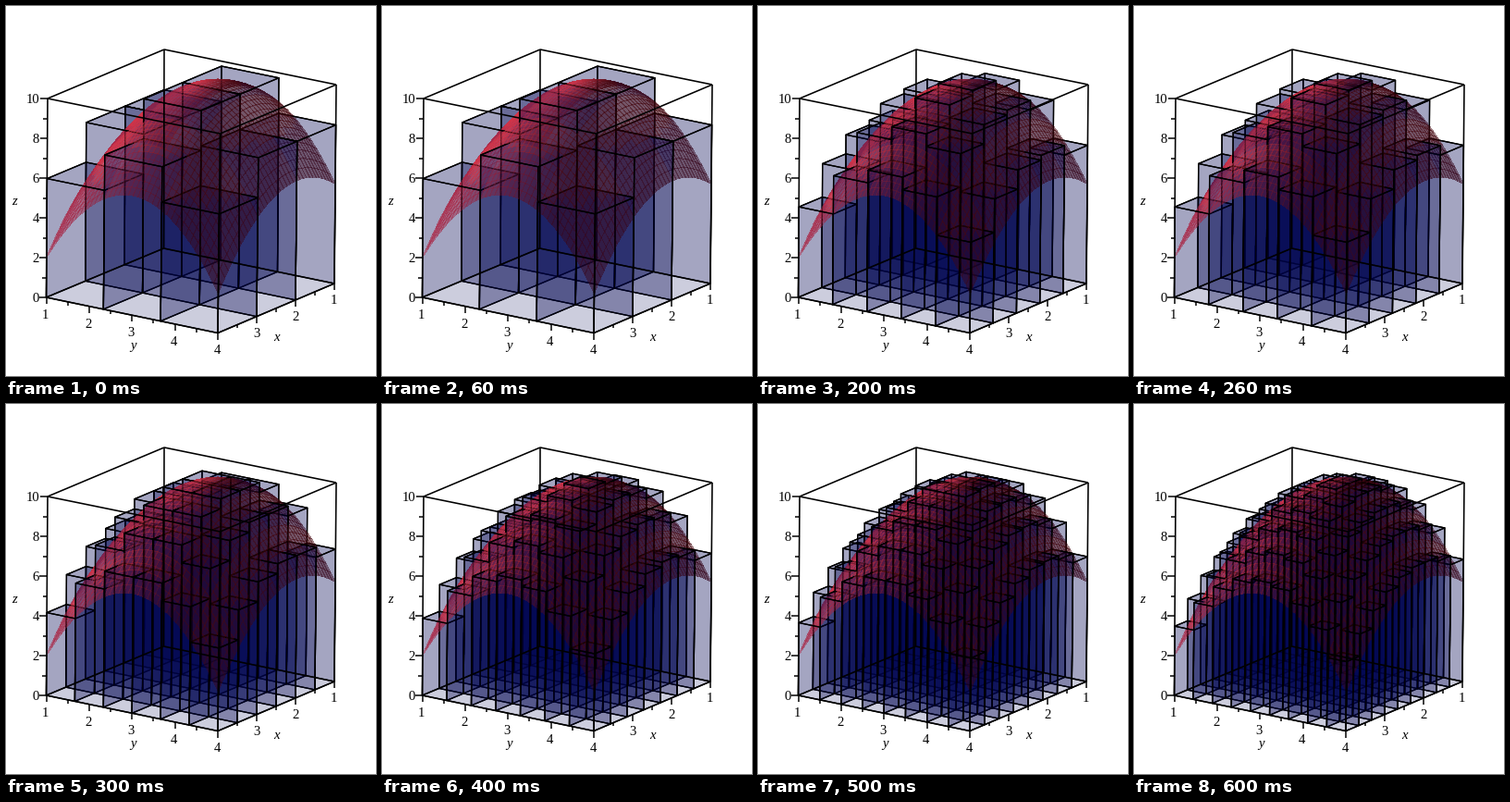
Recreate the animation shown at these times as a matplotlib script. Size 400 by 400 pixels, loop 700 ms.

```python
import numpy as np
import matplotlib.pyplot as plt
from matplotlib.animation import ArtistAnimation
from matplotlib.collections import LineCollection, PolyCollection

SIZE, DPI = 400, 100
PX = 72 / DPI  # points per pixel
FONT = "Liberation Serif"

# Screen position of the box corners, indexed [x][y][z]
CORNERS = np.array([
    [[(170.5, 262), (171, 47)], [(355, 300), (357, 85)]],
    [[(43.5, 315), (45, 100)], [(229, 353.5), (231.5, 138)]],
])

BLUE = (0.015, 0.035, 0.335, 0.2)
DARK = np.array([70, 8, 16]) / 255
LIGHT = np.array([212, 52, 72]) / 255
LIGHT_DIR = np.array([0.3, -0.8, 0.5])
SURFACE_ALPHA = 0.5


def height(x, y):
    return 10 - (x - 2) ** 2 - (y - 3) ** 2


def project(points):
    p = np.asarray(points, float)
    fracs = (p[..., 0] - 1) / 3, (p[..., 1] - 1) / 4, p[..., 2] / 10
    u, v, w = (np.stack([1 - t, t]) for t in fracs)
    return np.einsum("a...,b...,c...,abcd->...d", u, v, w, CORNERS)


def surface_color(x, y):
    normal = np.array([2 * (x - 2), 2 * (y - 3), 1])
    lit = max(0, normal @ LIGHT_DIR / np.linalg.norm(normal))
    return (*(DARK + (LIGHT - DARK) * min(1, lit / 0.85)), SURFACE_ALPHA)


def wall_x(x, y0, y1, z):
    return [(x, y0, 0), (x, y1, 0), (x, y1, z), (x, y0, z)]


def wall_y(y, x0, x1, z):
    return [(x0, y, 0), (x1, y, 0), (x1, y, z), (x0, y, z)]


def surface_patches(x0, x1, y0, y1, k):
    """Small quads of the surface over one cell, back to front."""
    xs, ys = np.linspace(x0, x1, k + 1), np.linspace(y0, y1, k + 1)
    for a, b in zip(xs, xs[1:]):
        for c, d in zip(ys, ys[1:]):
            quad = [(x, y, height(x, y))
                    for x, y in ((a, c), (b, c), (b, d), (a, d))]
            mx, my = (a + b) / 2, (c + d) / 2
            yield quad, surface_color(mx, my), height(mx, my)


def build(n):
    """Riemann boxes on an n by n grid, interleaved with the surface."""
    quads, colors, is_box = [], [], []

    def add(quad, color, box):
        quads.append(quad)
        colors.append(color)
        is_box.append(box)

    xs, ys = np.linspace(1, 4, n + 1), np.linspace(1, 5, n + 1)
    k = -(-36 // n)
    for x0, x1 in zip(xs, xs[1:]):
        for y0, y1 in zip(ys, ys[1:]):
            z = height((x0 + x1) / 2, (y0 + y1) / 2)
            patches = list(surface_patches(x0, x1, y0, y1, k))
            add(wall_x(x0, y0, y1, z), BLUE, True)
            add(wall_y(y0, x0, x1, z), BLUE, True)
            for quad, color, mid in patches:
                if mid < z:
                    add(quad, color, False)
            add([(x0, y0, z), (x1, y0, z), (x1, y1, z), (x0, y1, z)],
                BLUE, True)
            for quad, color, mid in patches:
                if mid >= z:
                    add(quad, color, False)
            add(wall_x(x1, y0, y1, z), BLUE, True)
            add(wall_y(y1, x0, x1, z), BLUE, True)

    flat = project(quads)
    box = np.array(is_box)
    solid = PolyCollection(
        flat, facecolors=colors,
        edgecolors=[(0, 0, 0, 1.0 if b else 0.0) for b in is_box],
        linewidths=np.where(box, 1.3 * PX, 0),
        antialiaseds=is_box, zorder=1)
    # Keeps the hidden edges readable through many layers
    ghost = PolyCollection(flat[box], facecolors="none",
                           edgecolors=(0, 0, 0, 0.12),
                           linewidths=1.2 * PX, zorder=2)
    return solid, ghost


def text(x, y, s, **kw):
    ax.text(x, y, s, family=FONT, size=14.7 * PX, va="baseline",
            **{"ha": "center", **kw})


def draw_frame():
    lines = []
    for a in (0, 1):
        for b in (0, 1):
            lines += [CORNERS[a, b], CORNERS[a, :, b], CORNERS[:, a, b]]
    ax.add_collection(LineCollection(lines, colors="k", linewidths=1.6 * PX,
                                     zorder=3))


def draw_ticks():
    ticks = []

    def tick(point, dx, dy, major):
        x, y = project(point)
        s = 1 if major else 0.55
        ticks.append([(x, y), (x + dx * s, y + dy * s)])
        return x, y

    for z in range(11):
        x, y = tick((4, 1, z), -8, 0, z % 2 == 0)
        if z % 2 == 0:
            text(36, y + 5, str(z), ha="right")
    for y in np.arange(1, 5, 0.5):
        px, py = tick((4, y, 0), 0, 7, y % 1 == 0)
        if y % 1 == 0:
            text(px - 0.8, py + 23, f"{y:.0f}")
    for x in np.arange(1, 4.5, 0.5):
        px, py = tick((x, 5, 0), 0, 7, x % 1 == 0)
        if x % 1 == 0:
            text(px - 0.3, py + 22, f"{x:.0f}")
    ax.add_collection(LineCollection(ticks, colors="k", linewidths=1.5 * PX,
                                     zorder=3))


fig = plt.figure(figsize=(SIZE / DPI, SIZE / DPI), dpi=DPI, facecolor="white")
ax = fig.add_axes([0, 0, 1, 1])
ax.set(xlim=(0, SIZE), ylim=(SIZE, 0))
ax.axis("off")

draw_frame()
draw_ticks()
for x, y, name in ((9, 215, "z"), (137.5, 371, "y"), (292, 362.5, "x")):
    text(x, y, name, style="italic")

steps = []
for n in range(3, 10):
    parts = build(n)
    for part in parts:
        ax.add_collection(part, autolim=False)
    steps.append(list(parts))

anim = ArtistAnimation(fig, steps, interval=100, repeat=True, repeat_delay=0)
plt.show()
```
